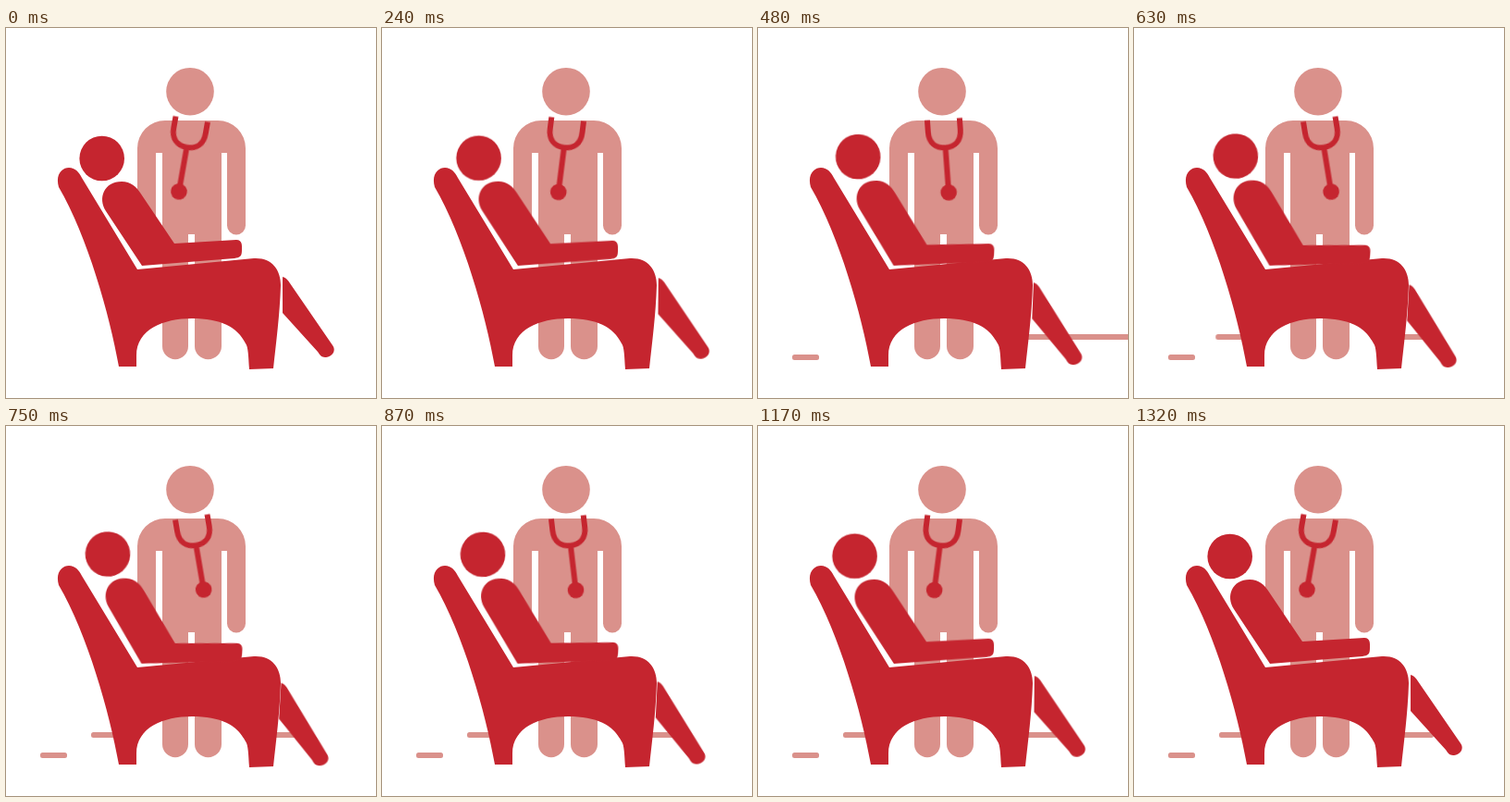
Animation of 400 by 400 pixels, one loop 1.35 s. Source, as an HTML page:

```html
<!DOCTYPE html>
<html lang="en">
<head>
<meta charset="utf-8">
<title>Patient chair</title>
<style>
  html, body { margin: 0; width: 100%; height: 100%; overflow: hidden; background: #fff; }
  svg { display: block; width: 100vw; height: 100vh; }

  .red { fill: #c5252f; }
  .pink { fill: #da918b; }
  .tube { fill: none; stroke: #c5252f; stroke-width: 6; }

  .patient, .scope, .floor, .dash {
    animation: 1350ms cubic-bezier(.37, 0, .63, 1) infinite;
  }
  .patient { transform-origin: 150px 247px; animation-name: recline; }
  .scope { transform-origin: 200.5px 100px; animation-name: swing; }
  .floor { animation-name: from-right; }
  .dash { animation-name: from-left; }

  @keyframes recline {
    0%, 6.667%, 97.778%, 100% { transform: rotate(0deg); }
    52.222% { transform: rotate(3.4deg); }
  }
  @keyframes swing {
    0%, 6.667%, 97.778%, 100% { transform: rotate(10deg); }
    52.222% { transform: rotate(-10deg); }
  }
  @keyframes from-right {
    0%, 21.11% { transform: translateX(320px); }
    43.33% { transform: translateX(-5px); }
    53.33%, 100% { transform: none; }
  }
  @keyframes from-left {
    0%, 17.78% { transform: translateX(-67px); }
    28.3%, 100% { transform: none; }
  }
</style>
</head>
<body>
<svg viewBox="0 0 400 400">
  <rect class="pink floor" x="92" y="331" width="232" height="6" rx="2.5"/>
  <rect class="pink dash" x="37" y="353" width="29" height="6" rx="2.5"/>

  <!-- opening under the seat hides the floor line -->
  <path fill="#fff" d="M141 366V354C141 326 170 314 201 314C232 314 250 323 259 341C262 345 262 355 263 366Z"/>

  <g class="pink">
    <circle cx="199" cy="68.7" r="25.8"/>
    <path d="M142 130a30 30 0 0 1 30-30H229a30 30 0 0 1 30 30V213.500a10 10 0 0 1-20 0V135H233V344a14.500 14.200 0 0 1-29 0V223H197V344a14 14.200 0 0 1-28 0V135H162V213a10 10 0 0 1-20 0Z"/>
  </g>

  <g class="scope">
    <path class="tube" d="M183 98.500V111C183 123 190 129.500 200.500 129.500S218 123 218 111V98.500M200.500 130V178"/>
    <circle class="red" cx="200.500" cy="178" r="8.800"/>
  </g>

  <path class="red" d="M57 172C53 158 61 151 68 151C75 151 79 156 82 162L142 261L268 249C288 248 297 262 297 278C296 310 292 340 289 368L263 369C262 355 262 345 259 341C250 323 232 314 201 314C170 314 141 326 141 354V366H122C112 310 88 225 57 172Z"/>

  <g class="red patient">
    <circle cx="103.700" cy="141" r="24.300"/>
    <path d="M108 198C99 184 106 166 125 166C135 166 141 172 145 178L182 233L249 229C256 229 255 236 255 240C255 247 253 248 247 249L147 257Z"/>
    <path d="M299 269C303 270 305 273 307 276L353 343C358 350 351 356 345 356C341 356 339 353 337 350L299 308Z"/>
  </g>
</svg>
</body>
</html>
```
